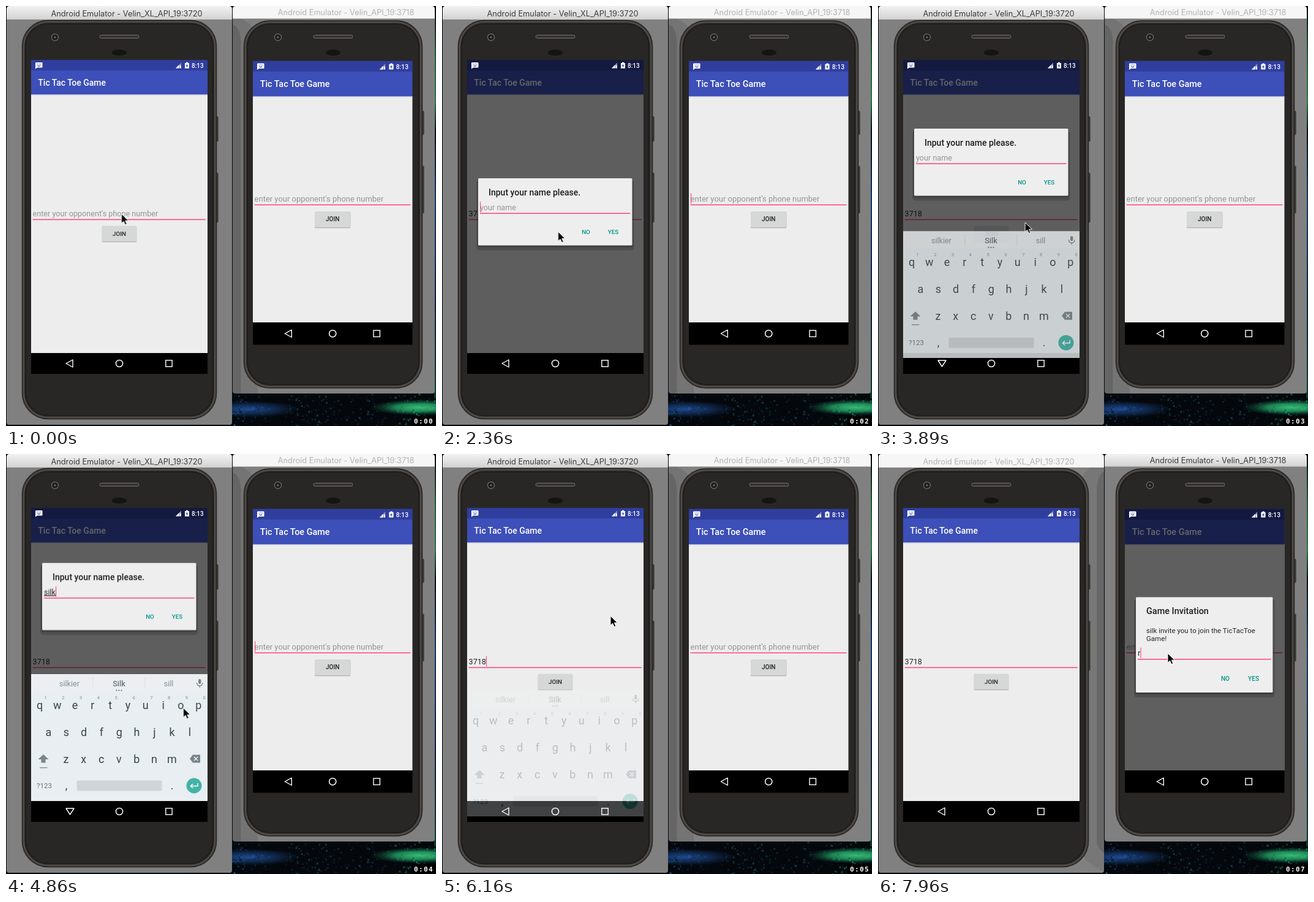
These frames come from a looping animation (702x685 px, 8 s). An HTML page:

```html
<!DOCTYPE html>
<html lang="en">
<head>
<meta charset="utf-8">
<title>Tic Tac Toe invitation</title>
<style>
html, body { margin: 0; width: 100%; height: 100%; overflow: hidden; background: #05090d; }
svg { display: block; width: 702px; height: 685px; font-family: Roboto, sans-serif; }
.medium { font-weight: 500; }
.mid { text-anchor: middle; }
.title { font: 12.8px Inter, sans-serif; text-anchor: middle; }
.counter { font: bold 11px "DejaVu Sans Mono", monospace; letter-spacing: 1.4px; fill: #fff; }

.anim, .pop { animation: 8s linear infinite; }
.pop { transform-box: fill-box; transform-origin: center; }
#pointer { animation-name: pointer; }
#dimA { animation-name: dimA; }
#dimB { animation-name: dimB; }
#popA { animation-name: popA; }
#popB { animation-name: popB; }
#lift { animation-name: lift; }
#keyboard { animation-name: keyboard; }
#pressJoin { animation-name: pressJoin; }
#pressYes { animation-name: pressYes; }
.early { animation-name: early; }
.late { animation-name: late; }

@keyframes pointer {
  0%, 16.8% { transform: translate(188.5px, 339px); }
  19%, 31.7% { transform: translate(189.5px, 368px); }
  41.7%, 46.5% { transform: translate(216px, 323px); }
  53%, 64.9% { transform: translate(289.5px, 414px); }
  67.2%, 80.3% { transform: translate(275px, 264px); }
  84.3%, 85.5% { transform: translate(457px, 311px); }
  90.1%, 100% { transform: translate(473px, 325px); }
}
@keyframes dimA {
  0%, 26% { opacity: 0; }
  29.5%, 72.5% { opacity: .6; }
  75.7%, 100% { opacity: 0; }
}
@keyframes dimB {
  0%, 82% { opacity: 0; }
  84.3%, 85.4% { opacity: .44; }
  86.8%, 100% { opacity: .6; }
}
@keyframes popA {
  0%, 26% { opacity: 0; transform: scale(.9); }
  28.8%, 72.5% { opacity: 1; transform: none; }
  75%, 100% { opacity: 0; transform: scale(.95); }
}
@keyframes popB {
  0%, 82% { opacity: 0; transform: scale(.9); }
  84.2%, 100% { opacity: 1; transform: none; }
}
@keyframes lift {
  0%, 46.6% { transform: none; animation-timing-function: ease-out; }
  50%, 100% { transform: translateY(-103.3px); }
}
@keyframes keyboard {
  0%, 46.5% { opacity: 0; transform: translateY(40px); animation-timing-function: ease-out; }
  50%, 75.2% { opacity: 1; transform: none; }
  77%, 78.1% { opacity: .28; transform: translateY(25.5px); }
  79%, 100% { opacity: 0; transform: translateY(36px); }
}
@keyframes pressJoin {
  0%, 22.4% { opacity: 0; }
  24.2%, 25.5% { opacity: .12; }
  28%, 100% { opacity: 0; }
}
@keyframes pressYes {
  0%, 70% { opacity: 0; }
  71.5%, 72.5% { opacity: .1; }
  74%, 100% { opacity: 0; }
}
@keyframes early { 0%, 91.37% { opacity: 1; } 91.38%, 100% { opacity: 0; } }
@keyframes late { 0%, 91.37% { opacity: 0; } 91.38%, 100% { opacity: 1; } }
</style>
</head>
<body>
<svg id="stage" viewBox="0 0 702 685"></svg>
<script>
const PINK = '#ff4081', TEAL = '#009688', PAPER = '#ededed', INK = '#262626', HINT = '#949494';

const box = (x, y, w, h, fill, more = '') =>
  `<rect x="${x}" y="${y}" width="${w}" height="${h}" fill="${fill}" ${more}/>`;
const text = (x, y, size, fill, label, more = '') =>
  `<text x="${x}" y="${y}" font-size="${size}" fill="${fill}" ${more}>${label}</text>`;
const line = d => `<path d="${d}" fill="none" stroke="#fff" stroke-width="1.4" stroke-linejoin="round"/>`;
const centred = 'class="mid"', bold = 'class="medium"', label = 'class="medium mid"';
const caret = (id, x, y) => box(x, y, 1.1, 17, PINK, `id="${id}"`);

let seed = 7;
const random = () => (seed = seed * 16807 % 2147483647) / 2147483647;

function wallpaper() {
  let out = box(0, 0, 702, 685, '#04080d') + box(699, 0, 3, 640, 'url(#edge)') +
    box(369, 630, 333, 55, 'url(#blue)') + box(369, 630, 333, 55, 'url(#green)');
  for (let i = 0; i < 620; i++) {
    const x = 370 + random() * 330, y = 632 + random() * 52, size = 1 + random() * 2.2;
    const hue = x < 455 ? '#2c66b8' : x > 605 ? '#45c987' : '#2a6f80';
    const fade = x < 455 ? (455 - x) / 120 : x > 605 ? (x - 605) / 160 : .45;
    out += box(x.toFixed(1), y.toFixed(1), size.toFixed(1), size.toFixed(1),
      random() < .45 ? '#03070c' : hue, `opacity="${(fade * random() + .05).toFixed(2)}"`);
  }
  return out;
}

function titleBar(p, active, phase) {
  const [x, , w] = p.win;
  return `<g class="anim ${phase}">
    <path d="M${x} ${p.bar}V5q0-5 5-5h${w - 10}q5 0 5 5V${p.bar}z" fill="${active ? 'url(#bar)' : '#f6f6f6'}"/>
    <text class="title" x="${p.titleX}" y="${p.bar - 5.5}" fill="${active ? '#3c3c3c' : '#b3b3b3'}">${p.title}</text></g>`;
}

function phone(p) {
  const [x, y, w, h] = p.body, cx = x + w / 2;
  const side = (top, height) => box(x + w - 1, top, 4, height, '#383633', 'rx="1.5" stroke="#55514d" stroke-width=".7"');
  return side(...p.power) + side(...p.volume) +
    box(x, y, w, h, '#3f3c39', 'rx="42" stroke="#2b2927" stroke-width="1.6"') +
    box(x + 2.5, y + 2.5, w - 5, h - 5, '#33302e', 'rx="40" stroke="#6b655f" stroke-width=".9"') +
    box(x + 5.5, y + 5.5, w - 11, h - 11, '#282726', 'rx="37" stroke="#161514" stroke-width="1.2"') +
    `<circle cx="${p.camera}" cy="51" r="5.5" fill="#1b1b1b" stroke="#6a6662" stroke-width="1.4"/>
     <circle cx="${p.camera}" cy="51" r="2" fill="#565452"/>
     <ellipse cx="${cx}" cy="76" rx="12" ry="5" fill="#141512"/>` +
    box(cx - 32, 47.5, 64, 5, '#35322f', 'rx="2.5" stroke="#77716b"');
}

function statusIcons(p) {
  return `<g transform="translate(${p.x + 7} ${p.y + 4})">
      <path d="M1 0h9.5q1 0 1 1v6.5q0 1-1 1H3L0 10.8V1q0-1 1-1z" fill="#fff"/>
      <path d="M2.5 2.8h1.5m1 0h1.5m1 0H9M3.5 5q2.3 2.4 4.6 0" fill="none" stroke="#303f9f" stroke-width="1.1"/></g>
    <g transform="translate(${p.x + p.w} ${p.y}) scale(${p.k})">
      <path d="M-52 13.5L-43 4.5V13.5z" fill="#8f9acb"/><path d="M-52 13.5l5.5-5.5v5.5zM-45.2 9h1.8v4.5h-1.8z" fill="#fff"/>
      <path d="M-37 5h2v-1.2h3V5h2v8.7h-7z" fill="#fff"/><path d="M-33 6l-2.5 4h1.7l-.4 3 2.6-4.3h-1.8z" fill="#303f9f"/>
      ${text(-26, 13, 10, '#fff', '8:13', bold)}</g>`;
}

function navIcons(p) {
  const y = (p.nav + p.end) / 2, cx = p.x + p.w / 2, dx = p.gap, r = 5.6;
  const back = line(`M${cx - dx - 6} ${y}l11-6v12z`);
  const hide = line(`M${cx - dx - 6} ${y - 5}h13l-6.5 10z`);
  return (p.hides ? `<g id="navBack">${back}</g><g id="navHide">${hide}</g>` : back) +
    `<circle cx="${cx}" cy="${y}" r="${r}" fill="none" stroke="#fff" stroke-width="1.5"/>` +
    box(cx + dx - 5.2, y - 5.2, 10.4, 10.4, 'none', 'stroke="#fff" stroke-width="1.4"');
}

function screen(p, extra) {
  const { x, y, w, k } = p, cx = p.x + p.w / 2, b = p.button;
  const join = fill => box(cx - b.w / 2, b.y, b.w, b.h, fill, 'rx="1.5"');
  return box(x, y, w, 17, '#2f3e9e') + box(x, y + 17, w, p.head - y - 17, '#3d4fb8') +
    box(x, p.head, w, p.nav - p.head, PAPER) + box(x, p.head - .5, w, 1.3, '#a9b1dc') +
    text(x + 11.3 * k, p.head - 14.7 * k, 14 * k, '#fff', 'Tic Tac Toe Game', bold) +
    text(x + 2.6, p.field, 12.6 * k, HINT, "enter your opponent's phone number", `id="hint${p.id}"`) +
    text(x + 2.6, p.field, 12.6 * k, INK, '', `id="number${p.id}"`) +
    caret('caret' + p.id, x + 3, p.field - 13.5) +
    box(x + 2.6, p.field + 4.6, w - 5.8, 1.5, PINK) +
    `<g transform="translate(0 1.3)" opacity=".25">${join('#000')}</g>` + join('#d6d7d7') +
    (p.hides ? box(cx - b.w / 2, b.y, b.w, b.h, '#000', 'id="pressJoin" class="anim"') : '') +
    text(cx, b.y + 16.2, 9.8 * k, '#222', 'JOIN', label) +
    box(x, y, w, p.nav - y, '#000', `id="dim${p.id}" class="anim"`) +
    box(x, p.nav, w, p.end - p.nav, '#000') + extra + statusIcons(p) + navIcons(p);
}

function dialog(id, x, y, w, h, size, heading, body, fieldY, noX, yesX) {
  const k = size / 12.6, foot = y + h - 18.7;
  return `<g id="pop${id}" class="pop">` +
    box(x - 3, y + 3, w + 6, h + 5, '#000', 'rx="5" opacity=".16"') +
    box(x - 1, y + 1, w + 2, h + 2, '#000', 'rx="3" opacity=".2"') +
    box(x, y, w, h, '#eeeeee', 'rx="1.5"') +
    text(x + 17, y + 27.5, 14 * k, '#1e1e1e', heading, bold) + body +
    text(x + 3, fieldY, size, HINT, 'your name', `id="nameHint${id}"`) +
    text(x + 3, fieldY, size, INK, '', `id="name${id}"`) +
    caret('nameCaret' + id, x + 3, fieldY - 13.5) +
    box(x + 3, fieldY + 4.8, w - 6, 1.5, PINK) +
    (id === 'A' ? box(yesX - 18, foot - 16, 36, 25, '#000', 'id="pressYes" class="anim" rx="2"') : '') +
    text(noX, foot, 9.8 * k, TEAL, 'NO', label) + text(yesX, foot, 9.8 * k, TEAL, 'YES', label) + '</g>';
}

function keyboard() {
  const step = 28.8, ink = '#37474f', grey = '#859096';
  const row = (letters, x, y) => [...letters].map((c, i) => text(x + i * step, y, 18, ink, c, centred)).join('');
  const digits = [...'1234567890'].map((d, i) => text(64.5 + i * step, 400, 7.5, grey, d, centred)).join('');
  const dots = [180.5, 184.5, 188.5].map(x => `<circle cx="${x}" cy="385.5" r="1.1" fill="#66747b"/>`).join('');
  return '<g id="keyboard" class="anim">' +
    box(41, 359, 288, 207, '#e8eef1') + box(41, 359, 288, 28.5, '#eceff1') +
    box(141.5, 365, 1, 18, '#d8dee1') + box(226.5, 365, 1, 18, '#d8dee1') +
    text(103.5, 379, 12.6, grey, 'silkier', centred) + text(184.5, 379, 12.6, '#66747b', 'Silk', label) +
    text(265.5, 379, 12.6, grey, 'sill', centred) + dots +
    box(314, 367, 4.4, 8, '#78858b', 'rx="2.2"') +
    '<path d="M311.5 373q0 5 4.7 5t4.7-5M316.2 378v3" fill="none" stroke="#78858b" stroke-width="1.3"/>' +
    digits + row('qwertyuiop', 55, 415.5) + row('asdfghjkl', 69.5, 459.5) + row('zxcvbnm', 98, 503.5) +
    `<path d="M61 490l8.5 8h-5v5.5h-7V498h-5zM55 511h12.5v1.2H55z" fill="#78858b"/>
     <path d="M300 497l5-6.5h12v13h-12z" fill="#78858b"/>
     <path d="M307 494l6 6m0-6l-6 6" stroke="#e8eef1" stroke-width="1.5"/>` +
    text(62.5, 545, 11.5, '#66747b', '?123', centred) + text(98.5, 547, 18, ink, ',', centred) +
    box(115.5, 532.5, 139, 17, '#cfd5d8', 'rx="2"') + text(271, 547, 18, ink, '.', centred) +
    `<circle cx="307" cy="541" r="12.5" fill="#42b3a5"/>
     <path d="M313 537v4.5h-11.5m3.5-3.5l-3.5 3.5 3.5 3.5" fill="none" stroke="#fff" stroke-width="1.5"/></g>`;
}

const host = {
  id: 'A', hides: true, win: [1, 0, 368, 683], bar: 22, titleX: 197, title: 'Android Emulator - Velin_XL_API_19:3720',
  body: [26.5, 23.5, 317, 650], camera: 80, power: [180, 41], volume: [272, 81],
  x: 41, y: 88, w: 288, k: 1, head: 144.5, nav: 566, end: 600, gap: 81, field: 343, button: { y: 358.5, w: 56.5, h: 25.5 }
};
const guest = {
  id: 'B', win: [370, 0, 330, 632], bar: 20.5, titleX: 555, title: 'Android Emulator - Velin_API_19:3718',
  body: [388.5, 24, 291, 599], camera: 444, power: [171, 39], volume: [261, 77],
  x: 403, y: 89.5, w: 260.5, k: 1.03, head: 147.5, nav: 516, end: 552.5, gap: 72, field: 319, button: { y: 335, w: 58.5, h: 26 }
};

function windowFrame(p, shade) {
  const [x, y, w, h] = p.win;
  return box(x, y + 8, w, h - 8, '#808080', 'rx="4"') + shade + phone(p);
}

const guestShade = `<g class="anim early"><path d="M370 30q13 4 13.5 30V632H370z" opacity=".13"/>
  <path d="M370 21h14q27 10 27 50V632H370z" opacity=".09"/></g>`;
const hostShade = `<g class="anim late"><path d="M369 28q-12 8-12 32V630q0 14 12 20z" opacity=".13"/>
  <path d="M369 22h-22q-17 10-17 40V640q0 25 39 40z" opacity=".07"/></g>`;

const message = text(438, 291.5, 11.5, INK, 'silk invite you to join the TicTacToe') +
  text(438, 304.7, 11.5, INK, 'Game!');

const stage = document.getElementById('stage');
stage.innerHTML = `<defs>
  <linearGradient id="bar" x2="0" y2="1"><stop stop-color="#f2f2f2"/><stop offset="1" stop-color="#d2d2d2"/></linearGradient>
  <linearGradient id="edge" x2="0" y2="1"><stop stop-color="#05090d"/><stop offset=".12" stop-color="#1d5a35"/>
    <stop offset=".24" stop-color="#2b7a45"/><stop offset=".32" stop-color="#06101a"/><stop offset=".5" stop-color="#123a6b"/>
    <stop offset=".75" stop-color="#0a2142"/><stop offset="1" stop-color="#0c3a2c"/></linearGradient>
  <radialGradient id="blue" cx=".08" cy=".5" r=".25"><stop stop-color="#1d4a90"/><stop offset="1" stop-color="#1d4a90" stop-opacity="0"/></radialGradient>
  <radialGradient id="green" cx=".92" cy=".45" r=".24"><stop stop-color="#37bd78"/><stop offset=".5" stop-color="#1b8253"/>
    <stop offset="1" stop-color="#0c4a35" stop-opacity="0"/></radialGradient></defs>` +
  wallpaper() +
  windowFrame(host, hostShade) + titleBar(host, true, 'early') + titleBar(host, false, 'late') + screen(host, keyboard()) +
  `<g id="lift" class="anim">${dialog('A', 59, 281, 251.5, 109.5, 12.6, 'Input your name please.', '', 332.7, 235, 279.5)}</g>` +
  windowFrame(guest, guestShade) + titleBar(guest, false, 'early') + titleBar(guest, true, 'late') + screen(guest, '') +
  dialog('B', 421, 233.5, 223.5, 155.5, 13, 'Game Invitation', message, 329.2, 567, 613) +
  `<path id="pointer" class="anim" d="M0 0V15.5l3.6-3.3 2.4 5.6 2.7-1.2-2.4-5.4h5z" fill="#000" stroke="#fff" stroke-width="1"/>` +
  box(662, 669, 40, 15.5, '#000') + '<text id="counter" class="counter" x="666" y="681"></text>';

const $ = id => document.getElementById(id);
const show = (id, on) => { $(id).style.visibility = on ? 'visible' : 'hidden'; };
const within = (t, spans) => spans.some(([from, to]) => t >= from && t < to);

// Each field: what is typed, when every key lands, and when its caret is lit.
const fields = [
  { input: 'numberA', hint: 'hintA', caret: 'caretA', word: '3718', keys: [120, 480, 720, 1110],
    lit: [[120, 1620], [5900, 6450], [7000, 7550]] },
  { input: 'nameA', hint: 'nameHintA', caret: 'nameCaretA', word: 'silk', keys: [4330, 4430, 4520, 4600],
    lit: [[2110, 2600], [3100, 3600], [4100, 5100], [5610, 5900]] },
  { input: 'nameB', hint: 'nameHintB', caret: 'nameCaretB', word: 'r', keys: [7960],
    lit: [[6600, 7150], [7660, 8000]] }
];
for (const f of fields) f.x = +$(f.input).getAttribute('x');
$('nameA').setAttribute('text-decoration', 'underline');

const start = performance.now();
function render() {
  const t = (performance.now() - start) % 8000;
  for (const f of fields) {
    const count = f.keys.filter(key => t >= key).length, typed = f.word.slice(0, count);
    const input = $(f.input);
    if (input.textContent !== typed) input.textContent = typed;
    show(f.hint, !count);
    show(f.caret, within(t, f.lit));
    $(f.caret).setAttribute('x', f.x + (count ? input.getComputedTextLength() : 0));
  }
  show('caretB', t > 335 && t < 6600 && Math.floor((t - 335) / 503) % 2 === 0);
  const hiding = within(t, [[3520, 6060]]);
  show('navHide', hiding);
  show('navBack', !hiding);
  $('counter').textContent = '0:0' + Math.floor(t / 1044);
  requestAnimationFrame(render);
}
render();
</script>
</body>
</html>
```
